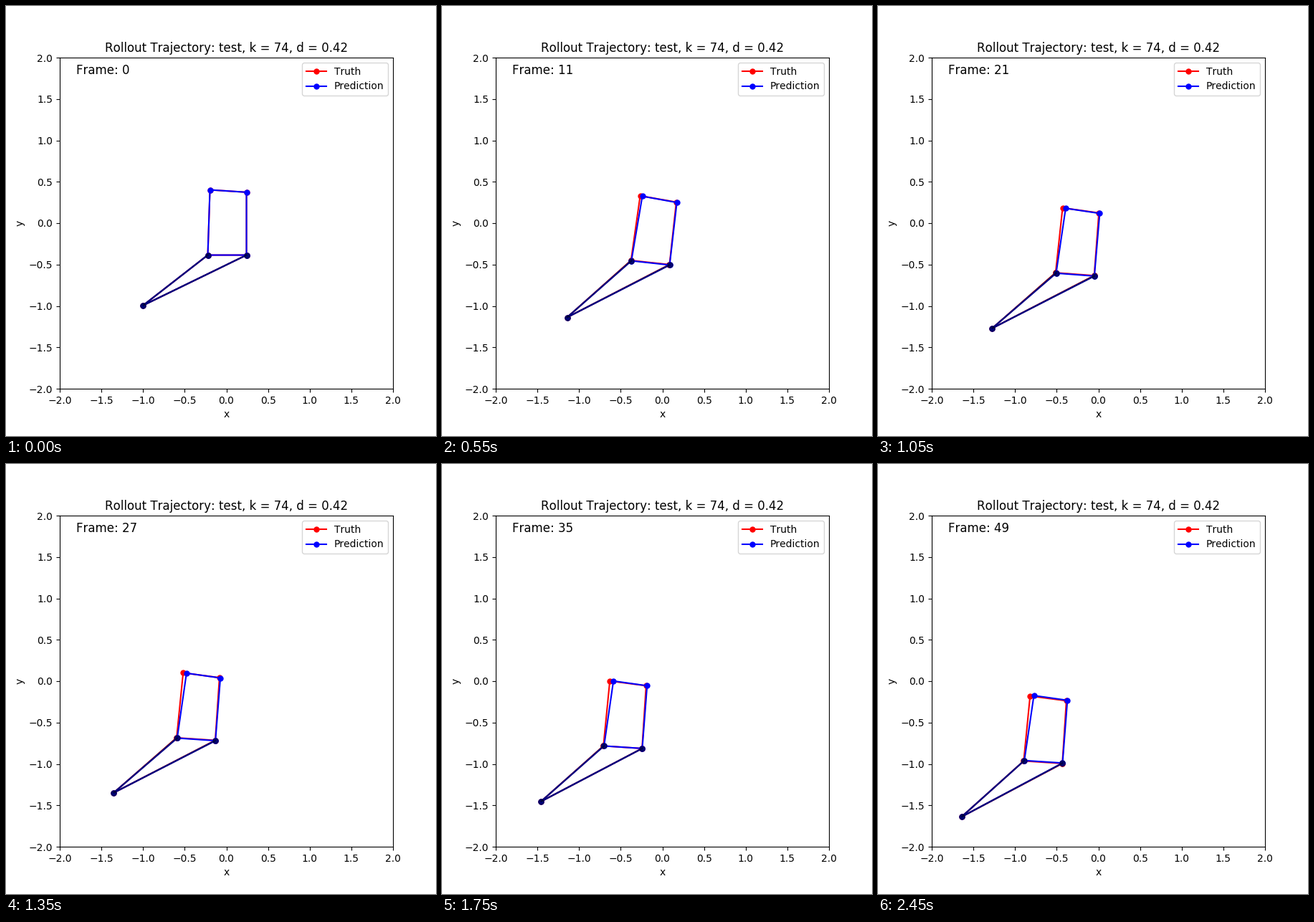
A matplotlib script that plays this animation: 600 by 600 pixels, repeating every 2500 ms.

```python
import numpy as np
import matplotlib.pyplot as plt
from matplotlib.animation import FuncAnimation

FRAMES, INTERVAL = 50, 50

# Corners around the box centre in pixels, y down: top left, top right, bottom right, bottom left
BOX = np.array([[-24.7, -46.3], [26.3, -43], [26.3, 44.7], [-27.7, 44.7]])
# Sideways error of the prediction at each corner
DRIFT = np.array([5.5, 1.5, 0.3, 0.9])

plt.rcParams["text.kerning_factor"] = 6
plt.rcParams["lines.markersize"] = 5


def to_data(p):
    return np.column_stack([(p[:, 0] - 307.5) / 116.25, (303 - p[:, 1]) / 115.5])


def pull_point(t):
    """The strings are pulled down and left at constant speed."""
    return np.array([191.25 - 1.522 * t, 417.8 + 1.52 * t])


def true_box(t):
    """The box starts at rest, lags behind the pull, swings and settles."""
    lag_x = 118 - 0.019 * t + 1.53 * t * np.exp(-t / 7.4)
    sway = 0.8 * np.cos(2 * np.pi * (t - 11) / 32)
    lag_y = -120.4 + 5 * np.exp(-t / 3.5) - sway
    swing = 0.125 * t**3 * np.exp(-t / 2.75)
    angle = np.radians(3.7 * (1 - np.exp(-(t / 8) ** 2)) + swing)
    c, s = np.cos(angle), np.sin(angle)
    return pull_point(t) + [lag_x, lag_y] + BOX @ np.array([[c, s], [-s, c]])


def predicted_box(t):
    """The true box with a growing error that bends its shape."""
    box = true_box(t)
    box[:, 0] += DRIFT * (1 - np.exp(-t / 14))
    box[:, 1] += 0.7 * np.sin(2 * np.pi * t / 70)
    return box


fig, ax = plt.subplots(figsize=(6, 6), dpi=100)
ax.set(xlim=(-2, 2), ylim=(-2, 2), xlabel="x", ylabel="y")
ax.set_title("Rollout Trajectory: test, k = 74, d = 0.42")
label = ax.text(-1.8, 1.8, "", fontsize=12)

bodies = []
for name, color, box in (("Truth", "r", true_box), ("Prediction", "b", predicted_box)):
    outline, = ax.plot([], [], "o-", color=color, label=name)
    strings, = ax.plot([], [], "o-", color="k", alpha=0.5)
    bodies.append((outline, strings, box))
ax.legend(loc="upper right")


def update(frame):
    pull = pull_point(frame)
    for outline, strings, box in bodies:
        tl, tr, br, bl = box(frame)
        outline.set_data(*to_data(np.array([bl, tl, tr, br, bl, pull, br])).T)
        strings.set_data(*to_data(np.array([bl, pull, br])).T)
    label.set_text(f"Frame: {frame}")
    return []


anim = FuncAnimation(fig, update, frames=FRAMES, interval=INTERVAL, repeat=True)
plt.show()
```
